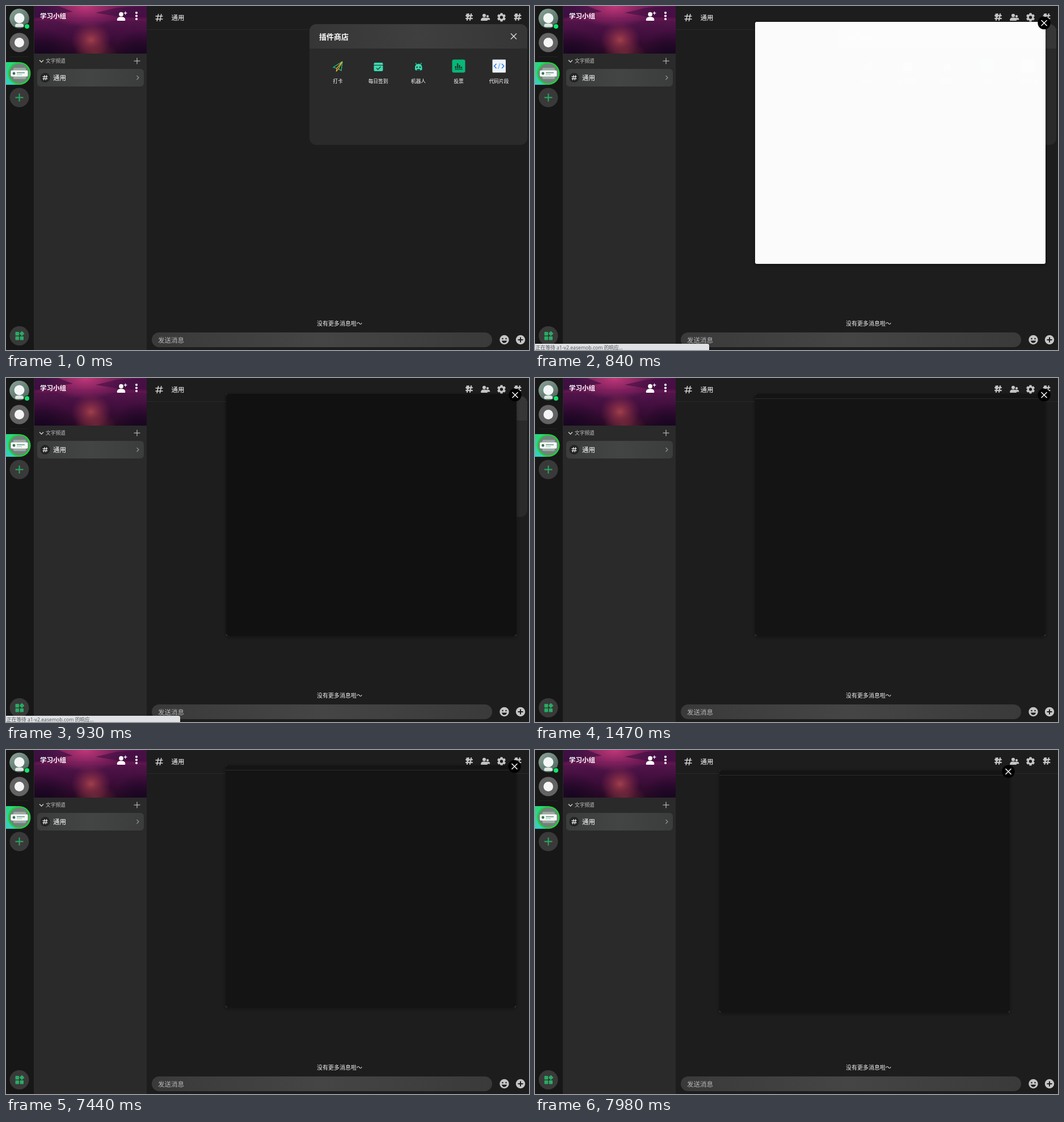
Write an HTML page with a canvas that moves like this. It is 922 by 607 pixels and loops after 8 s.

```html
<!DOCTYPE html>
<html lang="zh">
<head>
<meta charset="utf-8">
<style>
html, body { margin: 0; width: 100%; height: 100%; overflow: hidden; background: #1d1d1d; }
canvas { display: block; }
</style>
</head>
<body>
<canvas id="stage" width="922" height="607"></canvas>
<script>
const g = document.getElementById('stage').getContext('2d');
const LOOP = 8000;
const CJK = '"Noto Sans CJK SC", "Noto Sans CJK", sans-serif';
const clamp = v => Math.max(0, Math.min(1, v));

function box(x, y, w, h, fill, r = 0) {
  g.fillStyle = fill;
  g.beginPath();
  g.roundRect(x, y, w, h, r);
  g.fill();
}

function disc(x, y, r, fill) {
  g.fillStyle = fill;
  g.beginPath();
  g.arc(x, y, r, 0, Math.PI * 2);
  g.fill();
}

function line(points, color, width = 1, closed = false) {
  g.strokeStyle = color;
  g.lineWidth = width;
  g.beginPath();
  points.forEach(([x, y]) => g.lineTo(x, y));
  if (closed) g.closePath();
  g.stroke();
}

function poly(points, fill) {
  g.fillStyle = fill;
  g.beginPath();
  points.forEach(([x, y]) => g.lineTo(x, y));
  g.fill();
}

// cy is the middle of the glyph box
function text(str, x, cy, size, color, { weight = 400, align = 'left', family = CJK } = {}) {
  g.font = `${weight} ${size}px ${family}`;
  g.textAlign = align;
  g.fillStyle = color;
  g.fillText(str, x, cy + size * 0.38);
}

function shade(x0, y0, x1, y1, ...colors) {
  const s = g.createLinearGradient(x0, y0, x1, y1);
  colors.forEach((c, i) => s.addColorStop(i / (colors.length - 1), c));
  return s;
}

function glow(x, y, r, sx, color, clear) {
  g.save();
  g.translate(x, y);
  g.scale(sx, 1);
  const s = g.createRadialGradient(0, 0, 0, 0, 0, r);
  s.addColorStop(0, color);
  s.addColorStop(1, clear);
  disc(0, 0, r, s);
  g.restore();
}

function plus(x, y, r, color, width) {
  line([[x - r, y], [x + r, y]], color, width);
  line([[x, y - r], [x, y + r]], color, width);
}

function cross(x, y, r, color, width) {
  line([[x - r, y - r], [x + r, y + r]], color, width);
  line([[x - r, y + r], [x + r, y - r]], color, width);
}

function hash(x, y, r, color, width) {
  const k = r * 0.4;
  for (const s of [-1, 1]) {
    line([[x - r, y + s * k], [x + r, y + s * k]], color, width);
    line([[x + s * k + r * 0.2, y - r], [x + s * k - r * 0.2, y + r]], color, width);
  }
}

function person(x, y, k, color) {
  disc(x, y - 3.2 * k, 3.6 * k, color);
  box(x - 7 * k, y + 1.2 * k, 14 * k, 6.3 * k, color, [5 * k, 5 * k, k, k]);
}

function gear(x, y, color) {
  g.save();
  g.translate(x, y);
  for (let i = 0; i < 6; i++) {
    g.rotate(Math.PI / 3);
    box(-2.2, -7.6, 4.4, 4, color, 1);
  }
  g.restore();
  g.strokeStyle = color;
  g.lineWidth = 3.2;
  g.beginPath();
  g.arc(x, y, 4.3, 0, Math.PI * 2);
  g.stroke();
}

function banner() {
  g.save();
  g.beginPath();
  g.rect(50, 0, 198, 84);
  g.clip();
  box(50, 0, 198, 84, shade(0, 0, 0, 84, '#5b1750', '#511449', '#3d0d3a', '#250923'));
  glow(140, 0, 38, 1.9, 'rgba(205,58,125,.9)', 'rgba(205,58,125,0)');
  poly([[50, 0], [92, 0], [118, 10], [80, 15], [50, 24]], 'rgba(42,12,58,.55)');
  poly([[158, 12], [196, 3], [248, 0], [248, 24], [200, 19]], 'rgba(58,12,62,.55)');
  box(50, 20, 198, 6, 'rgba(128,24,92,.3)');
  glow(150, 60, 32, 1.1, 'rgba(166,66,76,.95)', 'rgba(150,45,75,0)');
  glow(158, 84, 24, 1.6, 'rgba(125,45,60,.7)', 'rgba(125,45,60,0)');
  glow(64, 84, 44, 1.3, 'rgba(20,5,32,.85)', 'rgba(20,5,32,0)');
  glow(236, 84, 42, 1.1, 'rgba(20,5,32,.8)', 'rgba(20,5,32,0)');
  g.restore();
}

function rail() {
  box(0, 0, 49, 607, '#171717');
  disc(23.5, 22, 17.3, shade(10, 6, 36, 40, '#88a095', '#4c665b'));
  disc(23.5, 21.5, 9, '#f3f7f5');
  box(16, 31, 15, 6, '#dce6e1', [6, 6, 3, 3]);
  disc(37, 36, 5, '#1b1b1b');
  disc(37, 36, 4, '#12e46c');
  disc(23.5, 64.5, 17, '#636363');
  disc(23.5, 64.5, 8.5, '#f5f5f5');
  box(6, 89, 34, 1, '#222222');
  box(0, 99, 24, 40, shade(0, 99, 0, 139, '#2bd67c', '#35cfc4'));
  disc(23.5, 119, 20, '#1fcf3b');
  disc(23.5, 119, 17.5, '#71827b');
  box(13, 109, 22, 20, '#9aa8a2', 2);
  box(8.5, 113.5, 30, 11, '#f4f8f6', 2);
  disc(14, 119, 2.4, '#3d7259');
  box(19, 117, 14, 1.5, '#5d9a7b');
  box(19, 120.5, 9, 1, '#9bbcac');
  disc(23.5, 161.5, 17, '#393939');
  plus(23.5, 161.5, 7, '#29ab63', 2);
  disc(23.5, 582, 17, '#393939');
  for (const [x, y] of [[16.5, 575], [16.5, 583], [24.5, 583]]) box(x, y, 6.5, 6.5, '#29ab63', 1);
  poly([[28, 573.5], [32.5, 578], [28, 582.5], [23.5, 578]], '#29ab63');
}

function sidebar() {
  box(49, 0, 199, 607, '#2a2a2a');
  banner();
  text('学习小组', 60, 18, 11.5, '#fff', { weight: 700 });
  person(203, 18, 1.05, '#fff');
  plus(210.5, 12.5, 2.8, '#fff', 1.3);
  for (const y of [12, 17.5, 23]) disc(230, y, 2.1, '#fff');
  line([[59, 95.5], [62.5, 99], [66, 95.5]], '#d5d5d5', 1.3);
  text('文字频道', 70, 97, 8.7, '#c5c5c5');
  plus(231, 97, 5.5, '#b8b8b8', 1.2);
  box(55, 111, 188, 31, shade(55, 0, 243, 0, '#3b3d3c', '#434544', '#3b3d3c'), 6);
  disc(69, 126.5, 8.5, '#232323');
  hash(69, 126.5, 4.5, '#f0f0f0', 1.2);
  text('通用', 83, 127, 11.5, '#fff');
  line([[230.5, 123], [234, 126.5], [230.5, 130]], '#929292', 1.2);
}

function chat() {
  box(248, 0, 674, 607, '#1d1d1d');
  box(248, 41, 674, 1, '#2a2a2a');
  hash(270, 20.5, 6.5, '#d2d2d2', 1.5);
  text('通用', 291.5, 21, 11.5, '#fff');
  const c = '#c6c6c6';
  for (const x of [816.5, 902]) {
    hash(x, 19.5, 6.3, c, 2.2);
    box(x - 5, 13.5, 5, 6, c);
  }
  person(849, 20, 0.6, c);
  person(843, 19.5, 0.85, c);
  gear(873.5, 20, c);
  text('没有更多消息啦～', 548, 560, 10, '#f2f2f2');
  box(257, 576, 600, 26, shade(257, 0, 857, 0, '#393a39', '#444544', '#393a39'), 13);
  text('发送消息', 268, 589.5, 11.5, '#b9b9b9');
  disc(878.5, 589, 8.2, c);
  disc(875.5, 587, 1.3, '#1d1d1d');
  disc(881.5, 587, 1.3, '#1d1d1d');
  g.fillStyle = '#1d1d1d';
  g.beginPath();
  g.arc(878.5, 590, 4.5, 0.1, Math.PI - 0.1);
  g.fill();
  disc(907, 589, 8.2, c);
  plus(907, 589, 4.5, '#1d1d1d', 2);
}

function tools() {
  // paper plane
  const green = '#1fd187';
  line([[593, 98], [577, 108], [583, 110]], green, 1.2);
  line([[593, 98], [591, 114], [586, 111]], green, 1.2);
  line([[593, 98], [583, 110], [582.5, 115], [586, 111], [593, 98]], '#f2b632', 1.2);
  // calendar
  const teal = '#3bd9ae';
  box(648.5, 100, 16, 4, teal, [2, 2, 0, 0]);
  box(648.5, 105, 16, 10, teal, [0, 0, 2, 2]);
  line([[653, 109.5], [655.7, 112], [660.5, 107]], '#24443b', 1.5);
  // robot
  box(719, 98, 17, 17, '#21302d', 3);
  box(721, 102, 12.5, 11.5, teal, [6, 6, 2, 2]);
  line([[723.5, 103], [722, 100.5]], teal, 1.2);
  line([[731, 103], [732.5, 100.5]], teal, 1.2);
  disc(724.6, 108, 1.3, '#21302d');
  disc(730, 108, 1.3, '#21302d');
  box(724.5, 111.5, 5.5, 2, '#21302d');
  // poll
  box(786.5, 94.5, 23, 23, '#07b878', 3);
  [4, 9, 6, 3].forEach((h, i) => box(791.5 + i * 3.4, 110 - h, 2.4, h, '#173d31'));
  box(791, 111, 14, 1.3, '#173d31');
  // code
  box(857.5, 94.5, 23.5, 23, '#eef4fc', 1);
  line([[864.5, 102], [860.7, 106], [864.5, 110]], '#2f7de8', 1.6);
  line([[874, 102], [877.8, 106], [874, 110]], '#2f7de8', 1.6);
  line([[871, 101], [867.5, 111]], '#79b2f7', 1.4);
}

function store(hover) {
  box(535, 32, 384, 213, '#2a2a2a', 12);
  box(535, 32, 384, 43, shade(535, 0, 919, 0, '#353635', '#3e3f3e', '#353635'), [12, 12, 0, 0]);
  text('插件商店', 552, 54, 13, '#fff', { weight: 700 });
  cross(895, 53.5, 5, '#d8d8d8', 1.4);
  if (hover) box(844, 89, 51, 57, '#4a4a4a', 4);
  tools();
  ['打卡', '每日签到', '机器人', '投票', '代码片段'].forEach((s, i) =>
    text(s, 585 + i * 71, 133, 8.7, '#fff', { align: 'center' }));
}

function dialog(t, dx, dy) {
  g.save();
  g.translate(dx, dy);
  g.save();
  g.shadowColor = 'rgba(0,0,0,.4)';
  g.shadowBlur = 7;
  g.shadowOffsetY = 2;
  box(388, 28, 512, 427, t < 930 ? 'rgba(255,255,255,.985)' : '#8a8a8a', 3);
  g.restore();
  if (t >= 930) {
    box(388, 28, 512, 427, t < 1020 ? '#111111' : '#141414', [3, 3, 4, 4]);
    if (t >= 1020) box(388, 36, 512, 1, '#2b2b2b');
  }
  disc(897.5, 30, 11.2, '#000');
  cross(897.5, 30, 5, '#fff', 1.5);
  g.restore();
}

function status() {
  box(0, 596, 307, 11, '#dfe1e4', [0, 3, 0, 0]);
  text('正在等待 a1-v2.easemob.com 的响应...', 1, 603, 8.7, '#505458',
    { family: '"Open Sans", ' + CJK });
}

function fade(alpha, draw) {
  if (alpha <= 0) return;
  g.save();
  g.globalAlpha = alpha;
  draw();
  g.restore();
}

function drag(t) {
  if (t < 7440) return [0, 0];
  const u = clamp(Math.floor((t - 7440) / 45) / 12);
  const p = u * u * (3 - 2 * u);
  const dip = 6 * Math.sin(Math.PI * p) * (1 - p);
  return [Math.round(-1 - 62 * p), Math.round(-1 + 9 * p - dip)];
}

function draw(t) {
  rail();
  sidebar();
  chat();
  fade(1 - clamp((t - 930) / 150), () => store(t >= 510 && t < 840));
  if (t < 840) return;
  dialog(t, ...drag(t));
  const gone = t < 1320 ? 0 : (Math.floor((t - 1320) / 50) + 1) / 4;
  fade(1 - gone, status);
}

let start;
function tick(now) {
  start ??= now;
  draw((now - start) % LOOP);
  requestAnimationFrame(tick);
}
requestAnimationFrame(tick);
</script>
</body>
</html>
```
